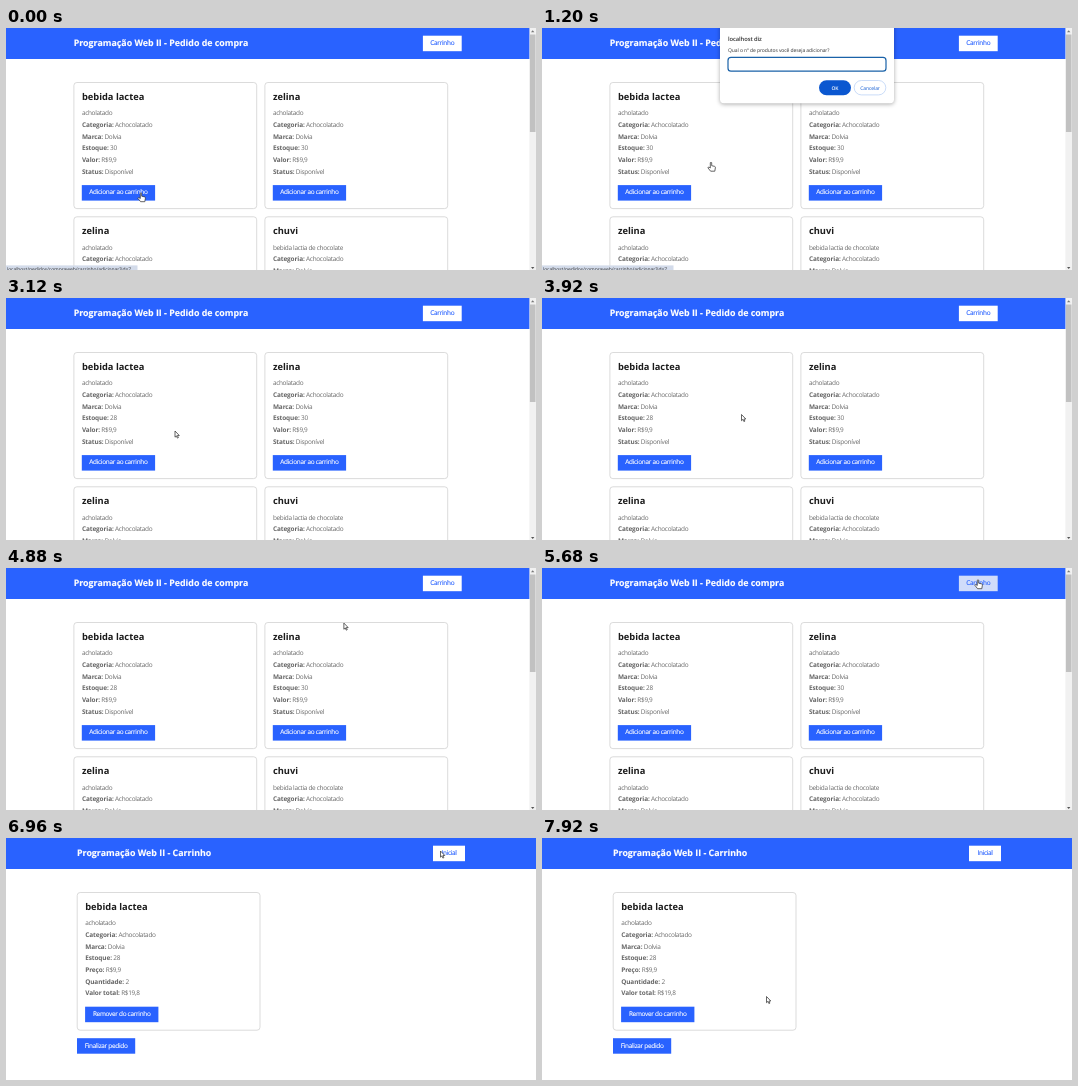
An HTML page that plays this animation: 530 by 242 pixels, repeating every 8000 ms.

```html
<!DOCTYPE html>
<html lang="pt-BR">
<head>
<meta charset="utf-8">
<style>
html, body { margin: 0; width: 100%; height: 100%; overflow: hidden; background: #fff; }
svg { display: block; width: 530px; height: 242px; font-family: "Open Sans", "Noto Sans", sans-serif; text-rendering: geometricPrecision; }
.title { font-size: 8.85px; font-weight: 700; fill: #fff; stroke: #fff; stroke-width: .15; }
.name { font-size: 9.3px; font-weight: 700; fill: #1c1c1c; }
.body, .button { font-size: 6.45px; letter-spacing: -.3px; }
.body { fill: #6a6a6a; }
.label { font-weight: 700; letter-spacing: -.1px; fill: #666; }
.button { text-anchor: middle; stroke-width: .12; }
.small { font-size: 5px; letter-spacing: -.08px; fill: #333; }
.card { fill: #fff; stroke: #ccc; stroke-width: .7; }
.cursor { fill: #fff; stroke: #333; stroke-width: .75; stroke-linejoin: round; }
.dialog { filter: drop-shadow(0 1px 2px #0005); }
</style>
</head>
<body>
<svg id="stage" viewBox="0 0 530 242"></svg>
<script>
const LOOP = 8000, BLUE = '#2962ff';
const OPEN = 480, TYPED = 1920, CLOSE = 3120, HOVER = 5120, LEAVE = 6240, CART = 6800;

const rect = (x, y, w, h, fill, extra = '') =>
  `<rect x="${x}" y="${y}" width="${w}" height="${h}" fill="${fill}" ${extra}/>`;
const text = (x, y, cls, content, extra = '') =>
  `<text x="${x}" y="${y}" class="${cls}" ${extra}>${content}</text>`;
const button = (x, y, w, label, fill = BLUE, ink = '#fff', id = '') =>
  rect(x, y, w, 15.5, fill, id && `id="${id}"`) +
  text(x + w / 2, y + 9.3, 'button', label, `fill="${ink}" stroke="${ink}"`);
const header = (x, title) => rect(0, 0, 530, 31, BLUE) + text(x, 18.2, 'title', title);

function card(x, y, height, name, description, fields, action) {
  const lines = fields.map(([label, value, id = '']) => [`<tspan class="label">${label}:</tspan>`, value, id])
    .map(([label, value, id], i) =>
      text(x + 8.2, y + 44.8 + i * 11.65, 'body', `${label} <tspan id="${id}">${value}</tspan>`));
  return `<rect class="card" x="${x + .2}" y="${y + .2}" width="182.8" height="${height - .4}" rx="3"/>` +
    text(x + 8.2, y + 17.3, 'name', name) + text(x + 8.2, y + 33.1, 'body', description) +
    lines.join('') + button(x + 8.1, y + height - 23.7, 73.3, action);
}

const product = (x, y, name, description, stockId) =>
  card(x, y, 126.5, name, description, [
    ['Categoria', 'Achocolatado'], ['Marca', 'Dolvia'], ['Estoque', '30', stockId],
    ['Valor', 'R$9,9'], ['Status', 'Disponível']
  ], 'Adicionar ao carrinho');

const shop = header(67.7, 'Programação Web II - Pedido de compra') +
  button(416.9, 7.7, 38.8, 'Carrinho', '#fff', BLUE, 'cartButton') +
  product(67.7, 54.3, 'bebida lactea', 'acholatado', 'stock') +
  product(258.7, 54.3, 'zelina', 'acholatado') +
  product(67.7, 188.6, 'zelina', 'acholatado') +
  product(258.7, 188.6, 'chuvi', 'bebida lactia de chocolate') +
  rect(523.4, 0, 6.6, 242, '#f1f1f1') + rect(523.9, 6.5, 5.6, 97.5, '#c1c1c1') +
  '<path d="M525 4.3l1.7-2 1.7 2z" fill="#777"/><path d="M525 239l1.7 2 1.7-2z" fill="#555"/>';

const status = rect(0, 237.4, 131.5, 5, '#d3dbea') +
  text(1, 242.6, 'small', 'localhost/pedidos/compraweb/carrinho/adicionar?id=7');

const dialog = rect(178, -6, 174, 81.3, '#fff', 'rx="4" class="dialog"') +
  text(186, 13, 'small', 'localhost diz', 'style="font-size:5.8px;font-weight:600"') +
  text(186, 24, 'small', 'Qual o nº de produtos você deseja adicionar?') +
  rect(186, 29.4, 158, 13.8, '#fff', 'rx="3" stroke="#1a62a8" stroke-width="1.2"') +
  text(189.5, 38.2, 'small', '2', 'id="typed"') + rect(192.6, 33.2, .6, 6, '#222', 'id="caret"') +
  rect(277, 52.2, 32, 15, '#0b57d0', 'rx="7.5"') +
  text(293, 61.6, 'small', 'OK', 'text-anchor="middle" style="fill:#fff;font-weight:600"') +
  rect(312.2, 52.5, 31.6, 14.4, '#fff', 'rx="7.2" stroke="#b4cdf5" stroke-width=".7"') +
  text(328, 61.6, 'small', 'Cancelar', 'text-anchor="middle" style="fill:#0b57d0"');

const cart = header(71, 'Programação Web II - Carrinho') +
  button(427, 7.7, 32, 'Inicial', '#fff', BLUE) +
  card(71, 54.3, 138.1, 'bebida lactea', 'acholatado', [
    ['Categoria', 'Achocolatado'], ['Marca', 'Dolvia'], ['Estoque', '28'],
    ['Preço', 'R$9,9'], ['Quantidade', '2'], ['Valor total', 'R$19,8']
  ], 'Remover do carrinho') +
  button(71, 200.2, 58.2, 'Finalizar pedido');

const layers = { shop, status, dialog, cart,
  arrow: '<path class="cursor" d="M0 0v6.2l1.4-1.3 1 2.2 1-.5-1-2.1h1.9z"/>',
  hand: '<path class="cursor" d="M-.7 .7q.7-1.2 1.4 0v3l3 .7q.8.3.7 1.2l-.6 3.6h-4.2l-2.7-3.4q.2-1 1.2-.6l1.2.8z"/>'
};
const $ = id => document.getElementById(id);
$('stage').innerHTML = Object.entries(layers).map(([id, body]) => `<g id="${id}">${body}</g>`).join('');

// Pointer tip: time, x, y
const path = [
  [0, 135, 164.5], [560, 135, 164.5], [1040, 169, 134], [2000, 169, 134], [2160, 169, 133],
  [3200, 169, 133], [3840, 199.5, 116.5], [4480, 199.5, 116.5], [5200, 436, 11.5],
  [6160, 436, 11.5], [6320, 434.5, 13], [7280, 434.5, 13], [7920, 224.5, 158.5], [8000, 224.5, 158.5]
];

function pointer(t) {
  const i = path.findIndex(p => p[0] > t);
  const [t0, x0, y0] = path[i - 1], [t1, x1, y1] = path[i];
  const u = (t - t0) / (t1 - t0), e = u * u * (3 - 2 * u);
  return [x0 + (x1 - x0) * e, y0 + (y1 - y0) * e];
}

const show = (id, on) => { $(id).style.display = on ? '' : 'none'; };

function draw(now) {
  const t = now % LOOP;
  const typed = t >= TYPED;
  const hovering = t >= HOVER && t < LEAVE;
  const hand = t < CLOSE || hovering;
  show('shop', t < LEAVE);
  show('status', t < CLOSE);
  show('dialog', t >= OPEN && t < CLOSE);
  show('cart', t >= CART);
  show('typed', typed);
  show('caret', (t - (typed ? TYPED : OPEN)) % 1000 < 500);
  $('caret').setAttribute('x', typed ? 192.6 : 189.6);
  $('stock').textContent = t < CLOSE ? '30' : '28';
  $('cartButton').setAttribute('fill', hovering ? '#d0dcfa' : '#fff');
  show('hand', hand);
  show('arrow', !hand);
  $(hand ? 'hand' : 'arrow').setAttribute('transform', `translate(${pointer(t)})`);
  requestAnimationFrame(() => draw(performance.now()));
}
draw(0);
</script>
</body>
</html>
```
